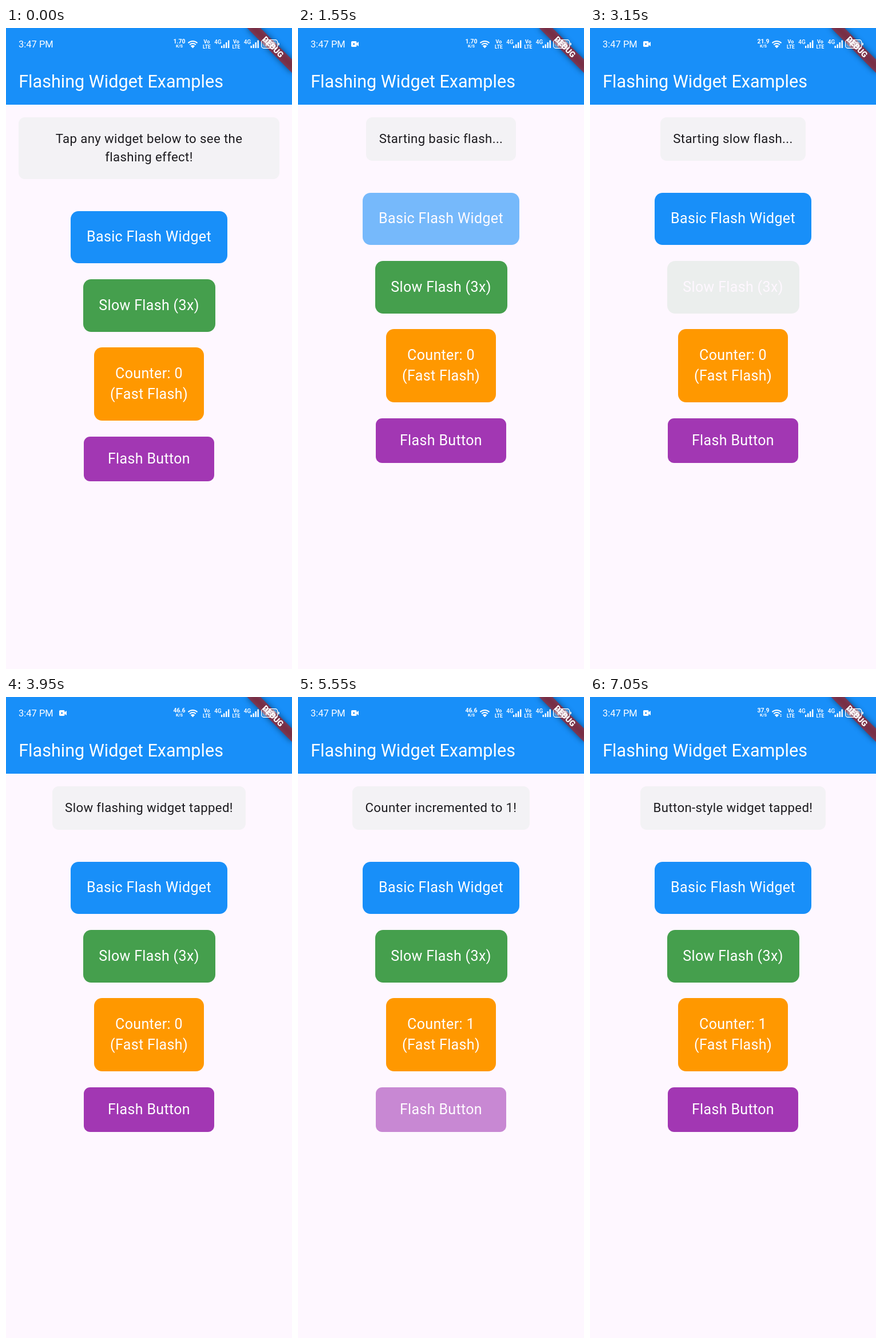
Recreate the animation shown at these times as an HTML page. Size 500x1120 px, loop 7.15 s.

```html
<!DOCTYPE html>
<html lang="en">
<head>
<meta charset="utf-8">
<title>Flashing Widget Examples</title>
<style>
  /* 1rem is ten device-independent pixels */
  html { font-size: 13.889px; }
  html, body { margin: 0; width: 100%; height: 100%; overflow: hidden; }
  body {
    position: relative;
    background: #fef7ff;
    font-family: Roboto, sans-serif;
    letter-spacing: .025rem;
    text-align: center;
  }
  header { position: absolute; left: 0; top: 0; width: 500px; height: 134px; background: #188ff9; }
  h1 {
    position: absolute; left: 1.6rem; top: 54.5px; margin: 0;
    font-size: 2.2rem; font-weight: 400; line-height: 5.6rem;
    letter-spacing: 0; color: #fff; white-space: nowrap;
  }
  main {
    position: absolute; left: 0; top: 133.5px; width: 500px; box-sizing: border-box;
    padding: 1.6rem; display: flex; flex-direction: column; align-items: center;
  }
  #message {
    padding: 1.6rem; margin-bottom: 4rem; border-radius: .8rem;
    background: #f3f2f5; color: #1c1b1f; font-size: 1.6rem; line-height: 2.3rem;
  }
  .widget {
    padding: 2rem; margin-bottom: 2rem; border-radius: 1rem;
    color: #fff; font-size: 1.8rem; line-height: 2.6rem; white-space: nowrap;
  }
  #basic { background: #188ff9; }
  #slow { background: #459f4d; }
  #fast { background: #ff9800; }
  #button { background: #a237b3; padding: 1.5rem 3rem; border-radius: .8rem; }
  svg { position: absolute; left: 0; top: 0; letter-spacing: 0; }
</style>
</head>
<body>
<header><h1>Flashing Widget Examples</h1></header>
<main>
  <div id="message"></div>
  <div class="widget" id="basic">Basic Flash Widget</div>
  <div class="widget" id="slow">Slow Flash (3x)</div>
  <div class="widget" id="fast">Counter: <span id="count">0</span><br>(Fast Flash)</div>
  <div class="widget" id="button">Flash Button</div>
</main>
<svg width="500" height="1120" viewBox="0 0 500 1120" fill="#fff" font-family="Roboto, sans-serif">
  <defs>
    <filter id="blur" x="-20%" y="-120%" width="140%" height="340%"><feGaussianBlur stdDeviation="3.9"/></filter>
    <g id="sim">
      <g font-size="9" font-weight="700" text-anchor="middle">
        <text x="7" y="27">Vo</text>
        <text x="7" y="35.5" font-size="8.5">LTE</text>
        <text x="26.5" y="28" font-size="10" font-weight="500">4G</text>
      </g>
      <path d="M32 31h2.4v4H32zM36 28.5h2.4V35H36zM40 25h2.4v10H40zM44 21.5h2.4V35H44z"/>
    </g>
  </defs>

  <!-- debug ribbon -->
  <g transform="translate(500 0) rotate(45) scale(1.389)">
    <rect x="-40" y="28" width="80" height="12" fill="#000" opacity=".5" filter="url(#blur)"/>
    <rect x="-40" y="28" width="80" height="12" fill="#b71c1c" fill-opacity=".627"/>
    <text x="0" y="37.3" font-size="10.2" font-weight="900" text-anchor="middle">DEBUG</text>
  </g>

  <!-- status bar -->
  <text x="22" y="34" font-size="16.5">3:47 PM</text>
  <g id="camera">
    <rect x="93" y="23" width="9.5" height="10" rx="1.8"/>
    <path d="M102 27l4-3v8l-4-3z"/>
    <circle cx="97.7" cy="28" r="1.5" fill="#188ff9"/>
  </g>
  <g font-weight="700" text-anchor="middle">
    <text id="speed" x="303" y="27" font-size="10.5"></text>
    <text x="303" y="34.3" font-size="7.5">K/S</text>
  </g>
  <g fill="none" stroke="#fff" stroke-width="2">
    <path d="M318.5 26.2a11.5 11.5 0 0 1 16 0M321.2 29.2a7.8 7.8 0 0 1 10.6 0"/>
  </g>
  <path d="M322.8 31.4a5.4 5.4 0 0 1 7.4 0L326.5 35.2z"/>
  <path id="traffic" d="M332 31.6l1.6-2 1.6 2zM332 33l1.6 2 1.6-2z"/>
  <use href="#sim" x="344"/>
  <use href="#sim" x="395.5"/>
  <rect x="446.7" y="20.7" width="28" height="14.6" rx="4" fill="none" stroke="#fff" stroke-width="1.4"/>
  <rect x="448.8" y="22.8" width="23.8" height="10.4" rx="2.2" opacity=".35"/>
  <text x="460.7" y="32" font-size="11" font-weight="700" text-anchor="middle" opacity=".85">100</text>
  <path d="M476 25.5q2 .4 2 2.5t-2 2.5z"/>
</svg>
<script>
const LOOP = 7150, STEP = 50, PAUSE = 8;
const $ = id => document.getElementById(id);

// half: time of one fade out or in, including the short pause after it
const flashes = {
  basic:  { start: 1102, half: 81,  count: 4 },
  slow:   { start: 2505, half: 133, count: 3 },
  fast:   { start: 4016, half: 57,  count: 6 },
  button: { start: 5519, half: 81,  count: 4 },
};
const endOf = ({ start, half, count }) => start + 2 * half * count;

const messages = [
  [0, 'Tap any widget below to see the flashing effect!'],
  [flashes.basic.start, 'Starting basic flash...'],
  [endOf(flashes.basic), 'Basic flashing widget tapped!'],
  [flashes.slow.start, 'Starting slow flash...'],
  [endOf(flashes.slow), 'Slow flashing widget tapped!'],
  [flashes.fast.start, 'Fast flashing counter...'],
  [endOf(flashes.fast), 'Counter incremented to 1!'],
  [endOf(flashes.button), 'Button-style widget tapped!'],
];
const speeds = [[0, '1.70'], [1950, '21.9'], [3950, '46.6'], [5950, '37.9']];

const latest = (list, t) => list.filter(([start]) => start <= t).pop()[1];

function flashOpacity(flash, t) {
  const x = t - flash.start;
  if (x < 0 || t >= endOf(flash)) return 1;
  const faded = Math.min(1, (x % flash.half) / (flash.half - PAUSE));
  return Math.floor(x / flash.half) % 2 ? faded : 1 - faded;
}

function setText(id, text) {
  if ($(id).textContent !== text) $(id).textContent = text;
}

function draw(t) {
  setText('message', latest(messages, t));
  setText('speed', latest(speeds, t));
  setText('count', t >= endOf(flashes.fast) ? '1' : '0');
  for (const id in flashes) $(id).style.opacity = flashOpacity(flashes[id], t);
  $('camera').style.opacity = Math.max(0, Math.min(1, (t - 150) / 200));
  $('traffic').style.opacity = t >= 5950 ? 1 : 0;
}

const begin = performance.now();
function tick() {
  const t = (performance.now() - begin) % LOOP;
  draw(Math.floor(t / STEP) * STEP);
  requestAnimationFrame(tick);
}
tick();
</script>
</body>
</html>
```
